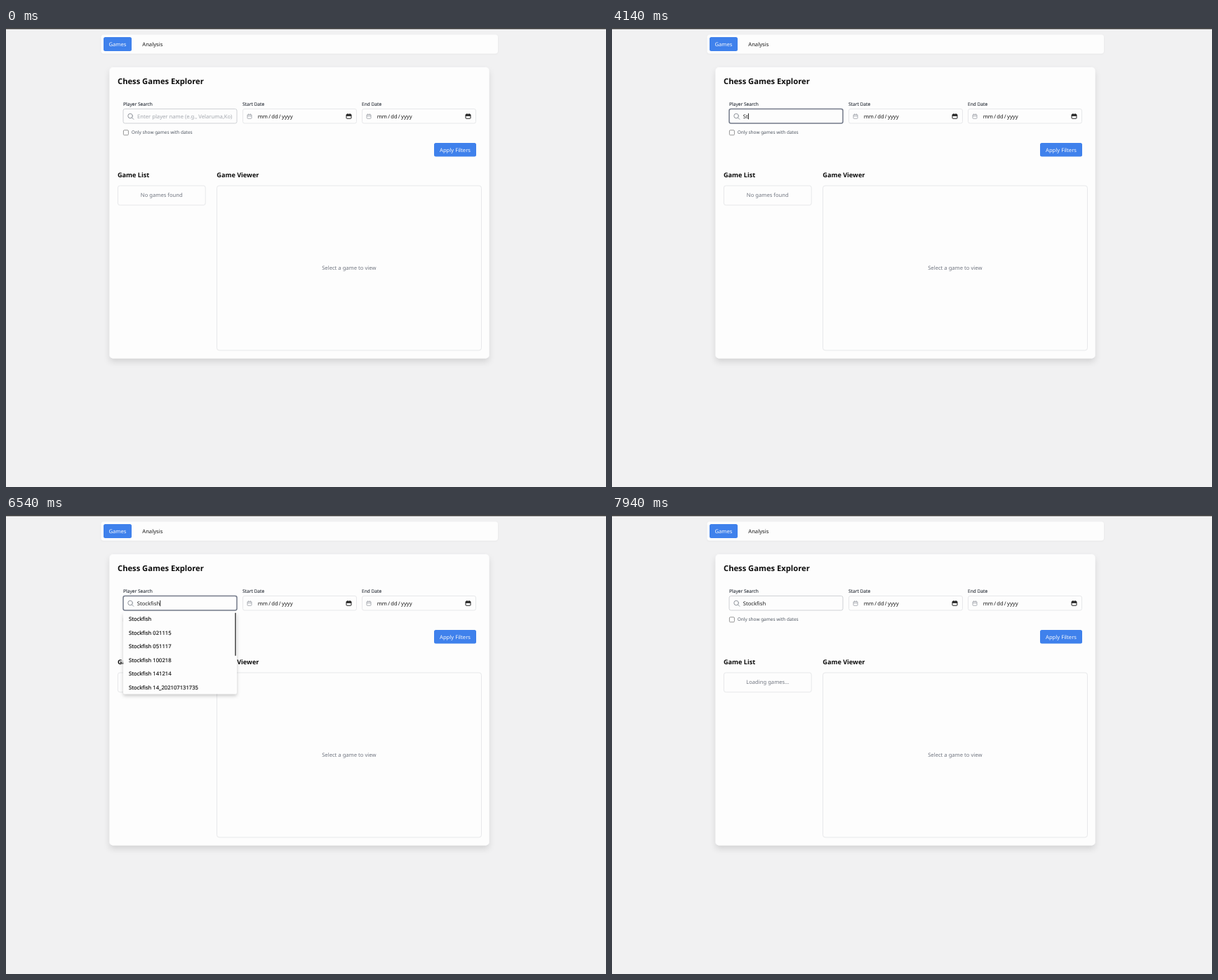
Recreate the animation shown at these times as an HTML page. Size 855 by 655 pixels, loop 8 s.

```html
<!DOCTYPE html>
<html lang="en">
<head>
<meta charset="utf-8">
<title>Chess Games Explorer</title>
<style>
  html, body { margin: 0; width: 100%; height: 100%; overflow: hidden; background: #f1f1f2; }
  svg { display: block; width: 855px; height: 655px; }
  text { font-family: "Noto Sans", "Open Sans", sans-serif; font-size: 7.65px; text-rendering: geometricPrecision; white-space: pre; }
  .title { font-size: 11.2px; font-weight: 700; fill: #0c0c0c; }
  .head { font-size: 9.15px; font-weight: 700; fill: #0c0c0c; }
  .label { font-size: 6.6px; fill: #30363f; stroke: #30363f; stroke-width: .12px; }
  .small { font-size: 6.47px; fill: #4f5661; }
  .body { fill: #1c1c1c; }
  .item { fill: #111; stroke: #111; stroke-width: .15px; }
  .hint { fill: #a3a7ae; }
  .muted { fill: #717680; }
  .light { fill: #f6f8fc; }
  .mid { text-anchor: middle; }
</style>
</head>
<body>
<svg id="stage" viewBox="0 0 855 655">
  <defs>
    <filter id="cardShadow" x="-10%" y="-10%" width="120%" height="120%">
      <feDropShadow dx="0" dy="5" stdDeviation="4.5" flood-color="#000" flood-opacity=".12"/>
    </filter>
    <filter id="navShadow" x="-5%" y="-50%" width="110%" height="200%">
      <feDropShadow dx="0" dy=".6" stdDeviation=".8" flood-color="#000" flood-opacity=".06"/>
    </filter>
    <filter id="listShadow" x="-15%" y="-15%" width="130%" height="135%">
      <feDropShadow dx="0" dy="3" stdDeviation="2.8" flood-color="#000" flood-opacity=".2"/>
    </filter>
  </defs>
</svg>
<script>
const LOOP = 8000;
const BLUE = '#3f81ec';
const PAPER = '#fdfdfd';
const LINE = '#e7e8ea';
const ROW = 19.62;
const stage = document.getElementById('stage');

function add(tag, attrs, parent = stage) {
  const el = document.createElementNS('http://www.w3.org/2000/svg', tag);
  for (const key in attrs) el.setAttribute(key, attrs[key]);
  parent.appendChild(el);
  return el;
}
function box(x, y, width, height, rx, attrs, parent) {
  return add('rect', { x, y, width, height, rx, ...attrs }, parent);
}
function frame(x, y, w, h, rx, stroke = LINE) {
  return box(x, y, w, h, rx, { fill: PAPER, stroke, 'stroke-width': 1 });
}
function label(x, y, cls, str, parent) {
  const el = add('text', { x, y, class: cls }, parent);
  el.textContent = str;
  return el;
}
function show(el, on) {
  el.style.display = on ? '' : 'none';
}
function calendar(x, y, w, h, color, bold) {
  const g = add('g', { fill: 'none', stroke: color, 'stroke-width': bold ? 1 : .7 });
  box(x, y, w, h, .8, {}, g);
  add('path', { d: `M${x} ${y + 2}h${w}M${x + w * .28} ${y - 1.2}v1.8M${x + w * .72} ${y - 1.2}v1.8` }, g);
  if (bold) box(x, y, w, 2, .5, { fill: color, stroke: 'none' }, g);
}
function dateField(x, name) {
  label(x, 111, 'label', name);
  frame(x + .5, 115.5, 162, 20.5, 2.5);
  calendar(x + 7, 123.5, 6, 5.7, '#8b9098', false);
  [['mm', 21.7], ['/', 37.3], ['dd', 41.3], ['/', 51.7], ['yyyy', 56]]
    .forEach(([str, dx]) => label(x + dx, 129, 'body', str));
  calendar(x + 148, 123.2, 7, 6, '#222', true);
}

// Page
box(0, 0, 855, 655, 0, { fill: '#f1f1f2' });
box(0, 0, 855, 1.6, 0, { fill: '#3a3a3a' });

box(135.5, 9.5, 565.5, 27, 4, { fill: PAPER, filter: 'url(#navShadow)' });
box(139, 13, 40, 20, 2.5, { fill: BLUE });
label(159, 26, 'light mid', 'Games');
label(208.8, 26, 'body mid', 'Analysis');

box(147.5, 56, 541, 415.5, 5, { fill: PAPER, filter: 'url(#cardShadow)' });
label(159, 80.2, 'title', 'Chess Games Explorer');

// Filters
label(167, 111, 'label', 'Player Search');
const field = frame(167, 115.5, 162, 20.5, 2.5, '#cfd1d5');
const lens = add('g', { fill: 'none', stroke: '#7d828b', 'stroke-width': .85, 'stroke-linecap': 'round' });
add('circle', { cx: 177.1, cy: 125.5, r: 3.3 }, lens);
add('path', { d: 'M179.5 128l2.3 2.3' }, lens);
const hint = label(187, 129, 'hint', 'Enter player name (e.g., Velaruma,Ko)');
const query = label(186.8, 129, 'body', '');
const caret = box(187, 121.8, .9, 8.4, 0, { fill: '#111' });
const spinner = add('path', {
  d: 'M-2.7 2.7A3.8 3.8 0 0 0 2.7 2.7', fill: 'none',
  stroke: '#979ca6', 'stroke-width': .8, 'stroke-linecap': 'round'
});
dateField(337, 'Start Date');
dateField(507, 'End Date');
box(167.4, 145.8, 7, 7, 1.2, { fill: '#fff', stroke: '#7b7b7b', 'stroke-width': .8 });
label(178.8, 151.4, 'small', 'Only show games with dates');
box(610, 164, 60, 19.5, 2.5, { fill: BLUE });
label(640, 176.5, 'light mid', 'Apply Filters');

// Panels
label(159, 213.4, 'head', 'Game List');
label(300.3, 213.4, 'head', 'Game Viewer');
frame(159.4, 225, 124.8, 27.8, 3);
const status = label(221.8, 241.4, 'muted mid', '');
frame(300.5, 225, 377, 235, 3.5);
label(488.8, 345, 'muted mid', 'Select a game to view');

// Suggestions
const list = add('g', {});
box(167, 138.2, 162, 117, 2.5, { fill: PAPER, filter: 'url(#listShadow)' }, list);
const hover = box(167, 0, 162, ROW, 0, { fill: '#eff0f3' }, list);
const items = Array.from({ length: 6 }, (_, i) => label(175, 151 + i * ROW, 'item', '', list));
const bar = box(326.2, 139.5, 1.6, 61.5, .8, { fill: '#4a4a4a' }, list);

const partial = ['Gravelstock, Oona TR', 'Fennelstock,T', 'Fennelstock, Olim',
  'Wilmstock,Pavo', 'Valdim,Torel da Cunha Stockby', 'Harvenstock, U.'];
const engines = ['', ' 021115', ' 051117', ' 100218', ' 141214', ' 14_202107131735']
  .map(tail => 'Stockfish' + tail);

// Times in ms
const keys = [2900, 4140, 4220, 4340, 4480, 5000, 5160, 5320, 5480];
const blinks = [900, 1820, 2280, 3480, 3960, 6080, 6540, 6740, 7060, 7500];
const hovers = [[6600, 3], [6740, 2], [6880, 1], [7000, 0]];
const FOCUS = 880, BLUR = 7500, CLOSE = 7740, LOADING = 7880;
const OPEN = 4960, RESULTS = 6500;

const passed = (times, t) => times.filter(at => at <= t).length;
const within = (t, a, b) => t >= a && t < b;

function draw(t) {
  const focused = within(t, FOCUS, BLUR);
  field.setAttribute('stroke', focused ? '#737a89' : '#cfd1d5');
  field.setAttribute('stroke-width', focused ? 1.5 : 1);

  const typed = passed(keys, t);
  query.textContent = 'Stockfish'.slice(0, typed);
  show(hint, !typed);
  show(caret, passed(blinks, t) % 2 === 1);
  caret.setAttribute('x', 187 + (typed ? query.getComputedTextLength() : 0));

  show(spinner, within(t, 4820, OPEN) || within(t, 5720, RESULTS));
  spinner.setAttribute('transform', `translate(320.5 126) rotate(${45 + (t - 6000) * .36})`);

  show(list, within(t, OPEN, CLOSE));
  const names = t < RESULTS ? partial : engines;
  items.forEach((el, i) => { el.textContent = names[i]; });
  const step = passed(hovers.map(h => h[0]), t);
  show(hover, step > 0);
  if (step) hover.setAttribute('y', 138.4 + hovers[step - 1][1] * ROW);
  show(bar, t >= 5720);

  status.textContent = t < LOADING ? 'No games found' : 'Loading games...';
}

function tick() {
  draw(performance.now() % LOOP);
  requestAnimationFrame(tick);
}
tick();
</script>
</body>
</html>
```
